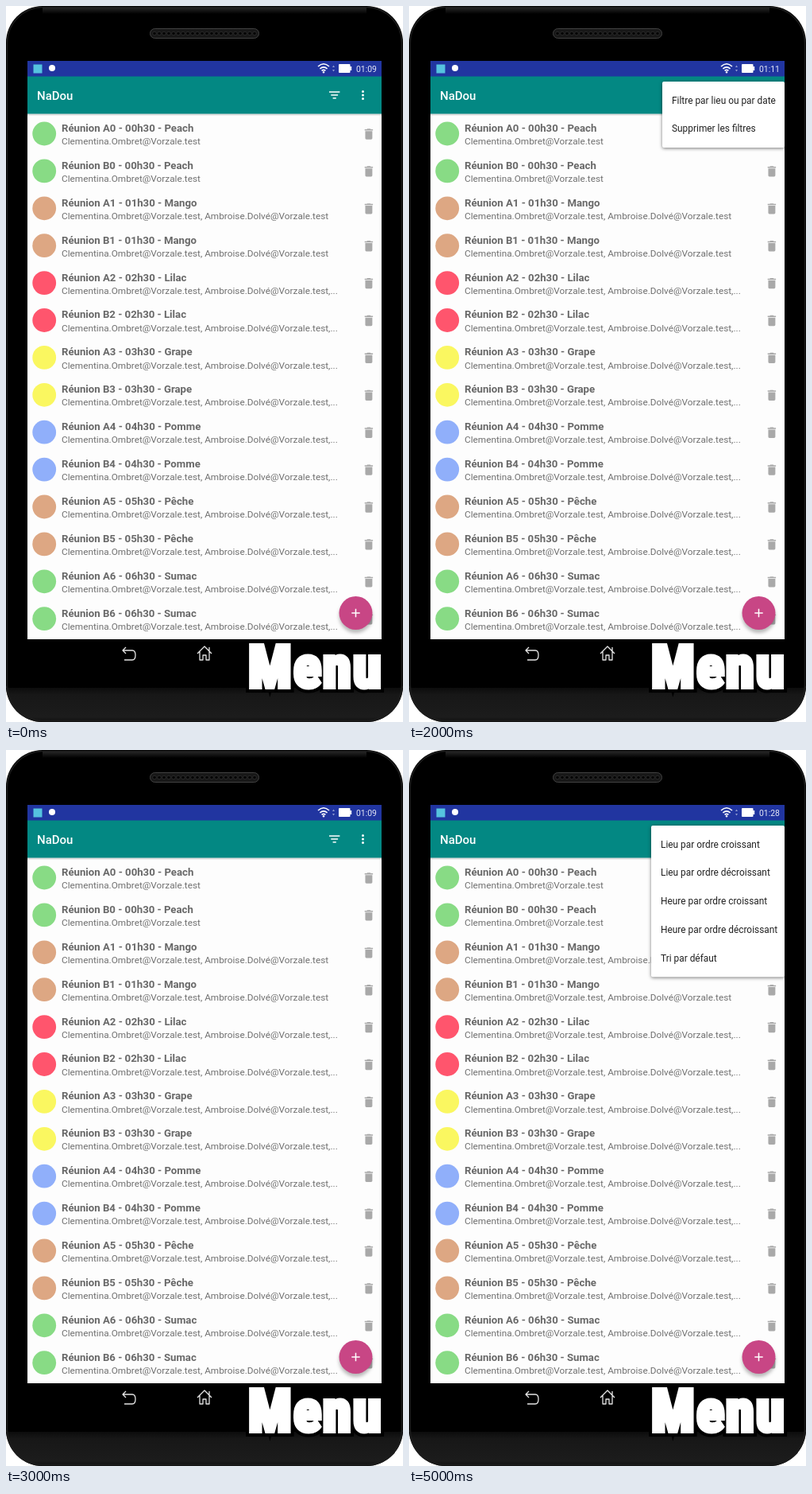
These frames come from a looping animation (500x900 px, 6 s). An HTML page:

```html
<!DOCTYPE html>
<html lang="fr">
<head>
<meta charset="utf-8">
<title>Menu</title>
<style>
  html, body { margin: 0; width: 100%; height: 100%; overflow: hidden; }
  svg { display: block; font-family: Roboto, sans-serif; }
  .title { font: 500 15px Roboto, sans-serif; fill: #fff; }
  .clock { font-size: 10.4px; fill: #e6e8f6; }
  .meeting { font: bold 13.2px Roboto, sans-serif; fill: #686868; }
  .guests { font-size: 11.8px; fill: #707070; }
  .item { font-size: 11.9px; fill: #222; }
  .caption {
    font: 900 76px Impact, "Roboto Condensed", "Open Sans Condensed", "Noto Sans", sans-serif;
    font-stretch: extra-condensed; letter-spacing: .033em;
    fill: #fff; stroke-linejoin: miter;
  }
  .popup { filter: drop-shadow(0 1px 2px #0008); }
  .focus { filter: drop-shadow(0 0 3px #ff0) drop-shadow(0 0 4px #ff0) drop-shadow(0 0 5px #ff0a); }
  .fab { filter: drop-shadow(0 4px 2px #0004); }
  .icon { fill: none; stroke: #e4e4e4; stroke-width: 1.3; stroke-linejoin: round; }
</style>
</head>
<body>
<svg id="stage" width="500" height="900" viewBox="0 0 500 900"></svg>
<script>
const GREEN = "#88db85", TAN = "#dda783", RED = "#ff556d", YELLOW = "#faf760", BLUE = "#90affa";
const ROOMS = [
  ["Peach", GREEN], ["Mango", TAN], ["Lilac", RED], ["Grape", YELLOW],
  ["Pomme", BLUE], ["Pêche", TAN], ["Sumac", GREEN]
];
const HOST = "Clementina.Ombret@Vorzale.test";
const GUEST = "Ambroise.Dolvé@Vorzale.test";
const CLOCKS = ["01:09", "01:09", "01:11", "01:09", "01:09", "01:28"];

const stage = document.getElementById("stage");
const repeat = (count, draw) => Array.from({ length: count }, (_, i) => draw(i)).join("");
const rect = (x, y, w, h, fill, extra = "") =>
  `<rect x="${x}" y="${y}" width="${w}" height="${h}" fill="${fill}" ${extra}/>`;
const circle = (x, y, r, fill, extra = "") =>
  `<circle cx="${x}" cy="${y}" r="${r}" fill="${fill}" ${extra}/>`;
const text = (x, y, cls, content, extra = "") =>
  `<text x="${x}" y="${y}" class="${cls}" ${extra}>${content}</text>`;

function phone() {
  return `<defs>
    <linearGradient id="chin" x2="0" y2="1">
      <stop stop-color="#0c0c0c"/><stop offset=".2" stop-color="#171717"/>
      <stop offset=".85" stop-color="#1c1c1c"/><stop offset="1" stop-color="#101010"/>
    </linearGradient>
    <linearGradient id="brow" x2="0" y2="1">
      <stop stop-color="#2c2c2c"/><stop offset="1" stop-color="#000"/>
    </linearGradient>
    <clipPath id="body"><rect width="500" height="900" rx="46"/></clipPath>
  </defs>
  <g clip-path="url(#body)">
    ${rect(0, 0, 500, 900, "#000")}
    ${rect(46, 1, 408, 9, "url(#brow)")}
    ${rect(0, 857, 500, 43, "url(#chin)")}
    ${rect(1.5, 1.5, 497, 897, "none", 'rx="45" stroke="#1c1c1c" stroke-width="1.5"')}
  </g>
  ${rect(181.5, 28.5, 137, 12, "#181818", 'rx="6" stroke="#424242"')}
  ${repeat(22, i => circle(187 + i * 6, 34.5, 2.3, "#050505", 'stroke="#303030" stroke-width=".8"'))}`;
}

function meetingRow(i) {
  const y = 160.5 + i * 46.9, hour = i >> 1;
  const [room, color] = ROOMS[hour];
  const guests = HOST + (hour ? `, ${GUEST}` : "") + (hour > 1 ? ",..." : "");
  return circle(48.2, y, 14.9, color)
    + text(70, y - 2.6, "meeting", `Réunion ${"AB"[i % 2]}${hour} - 0${hour}h30 - ${room}`)
    + text(70, y + 13.6, "guests", guests)
    + `<path transform="translate(448 ${y - 8.4}) scale(.743)" fill="#a9a9a9"
        d="M6 19q0 2 2 2h8q2 0 2-2V7H6zM19 4h-3.5l-1-1h-5l-1 1H5v2h14z"/>`;
}

function statusBar() {
  return rect(27, 69, 446, 19.5, "#2135a0")
    + rect(34.5, 73.5, 11, 11, "#55c3df")
    + circle(58, 78, 4, "#fff")
    + `<g fill="none" stroke="#fff" stroke-width="1.6">
        <path d="M393 76q7-6.5 14 0M395.4 78.8q4.6-4 9.2 0M397.6 81.4q2.4-2 4.8 0"/></g>`
    + circle(400, 83.3, 1.2, "#fff")
    + `<path d="M411 77l1.5-2.5 1.5 2.5zM411 80l1.5 2.5 1.5-2.5z" fill="#8f9ad0"/>`
    + rect(419, 73, 14.5, 11, "#fff", 'rx="1"') + rect(433, 76, 2.2, 5, "#fff")
    + text(441, 82.8, "clock", "", 'id="clock"');
}

function toolbar() {
  return rect(27, 135, 446, 2.5, "#0002") + rect(27, 88, 446, 47.5, "#038883")
    + text(39, 117.8, "title", "NaDou")
    + repeat(3, i => rect(407 + i * 2.3, 107.3 + i * 3.9, 13.4 - i * 4.6, 1.5, "#fff"))
    + repeat(3, i => circle(449.5, 107.4 + i * 4.5, 1.5, "#fff"));
}

function navigation() {
  return `<g class="icon">
    <path d="M151 806l-4 4 4 4M147 810h12q4 0 4 6t-4 6h-10"/>
    <path d="M241 814l9-9 9 9M244 811.5V822h4v-6h4v6h4v-10.5M256 811v-5"/></g>`;
}

function floatingButton() {
  return circle(440.5, 763, 21, "#c84685", 'class="fab"')
    + '<path d="M435.3 763h10.4M440.5 757.8v10.4" stroke="#fff" stroke-width="1.5"/>';
}

function popup(scene, x, items) {
  return `<g data-scene="${scene}">
    ${rect(x, 95, 473 - x, 11.5 + items.length * 35.75, "#fff", 'rx="2" class="popup"')}
    ${items.map((label, i) => text(x + 12, 122.7 + i * 35.75, "item", label)).join("")}</g>`;
}

function focusFrame(scene, x, y, height) {
  return `<g data-scene="${scene}" class="focus">
    ${rect(x, y, 48, height, "none",
      'stroke="#808080" stroke-width="10" stroke-dasharray="20 10" stroke-dashoffset="6"')}</g>`;
}

function caption() {
  return text(305, 856, "caption", "Menu", 'stroke="#000" stroke-width="14"')
    + text(305, 856, "caption", "Menu", 'stroke="#fff" stroke-width="6"');
}

stage.innerHTML = phone()
  + rect(27, 69, 446, 727, "#fdfdfd")
  + repeat(14, meetingRow)
  + toolbar() + statusBar() + floatingButton() + navigation()
  + focusFrame(1, 389, 86, 58)
  + popup(2, 319, ["Filtre par lieu ou par date", "Supprimer les filtres"])
  + focusFrame(4, 428, 85, 56)
  + popup(5, 305, ["Lieu par ordre croissant", "Lieu par ordre décroissant",
      "Heure par ordre croissant", "Heure par ordre décroissant", "Tri par défaut"])
  + caption();

// Keep the caption inside the phone whichever family is available.
for (const word of stage.querySelectorAll(".caption")) {
  const size = Math.min(76, 76 * 170 / word.getComputedTextLength());
  word.style.fontSize = `${size}px`;
}

const clock = document.getElementById("clock");
const overlays = stage.querySelectorAll("[data-scene]");
const start = performance.now();

function render(now) {
  const scene = Math.floor(Math.max(0, now - start) / 1000) % 6;
  clock.textContent = CLOCKS[scene];
  for (const overlay of overlays) {
    overlay.style.display = +overlay.dataset.scene === scene ? "" : "none";
  }
  requestAnimationFrame(render);
}
render(start);
</script>
</body>
</html>
```
